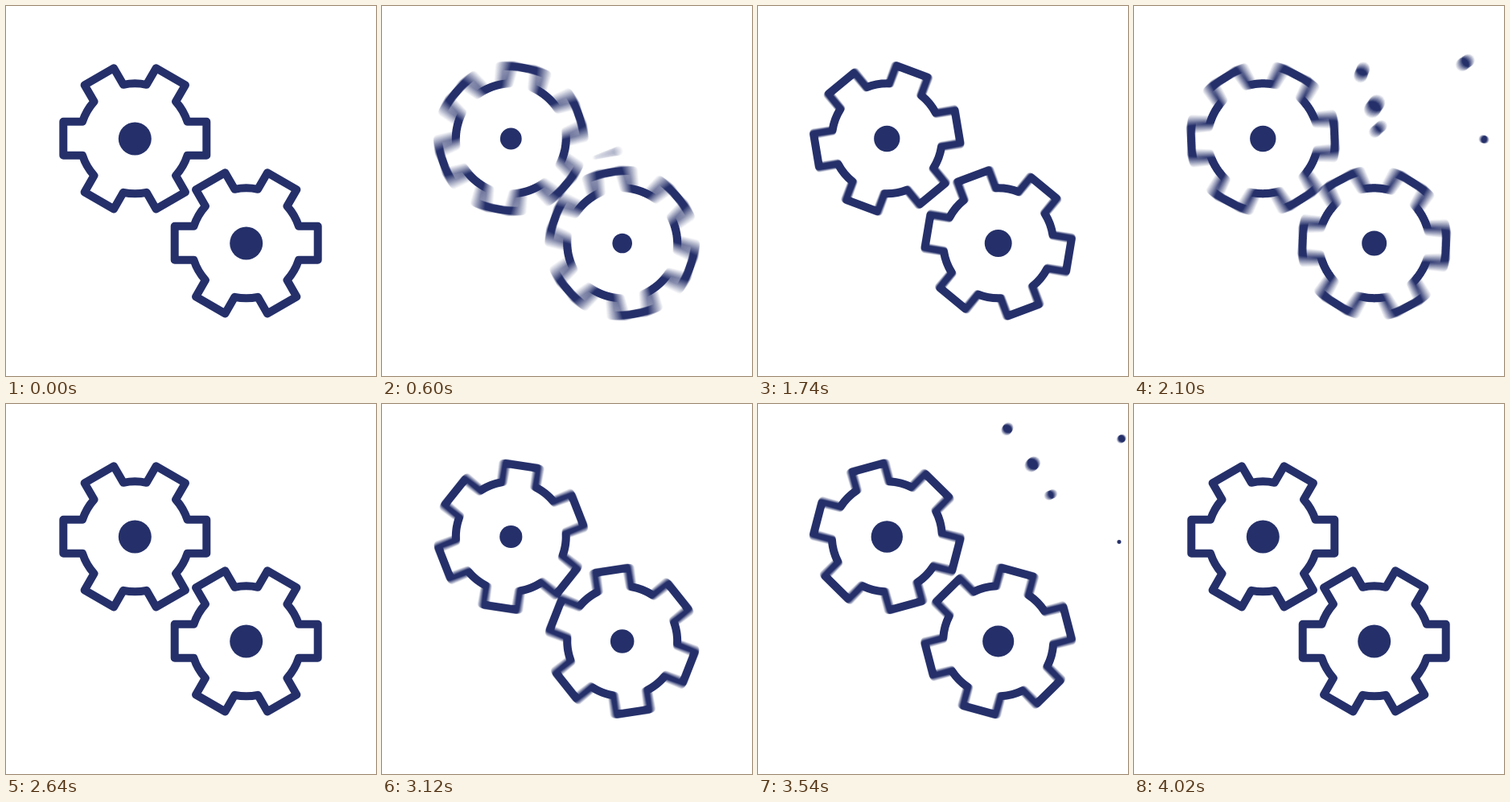
These frames come from a looping animation (460x460 px, 4.05 s). An HTML page with a canvas:

```html
<!DOCTYPE html>
<html lang="en">
<head>
<meta charset="utf-8">
<title>Gears</title>
<style>
  html, body { margin: 0; width: 100%; height: 100%; overflow: hidden; background: #fff; }
  canvas { display: block; width: 460px; height: 460px; }
</style>
</head>
<body>
<canvas id="stage" width="460" height="460"></canvas>
<script>
const SIZE = 460, LOOP = 4050, STEP = 30;
const FIRST = 270, PERIOD = 1320, SPINS = 3, TURN = 810, ACTIVE = 1020;
const SHUTTER = 15;
const NAVY = '#25306a';

const ctx = document.getElementById('stage').getContext('2d');
const layer = document.createElement('canvas');
layer.width = layer.height = SIZE;
const ink = layer.getContext('2d');

const gears = [
  { x: 160.3, y: 164.8, dir: -1, small: 13.4, shrink: 260 },
  { x: 298.7, y: 294.8, dir: 1, small: 12.3, shrink: 330 }
];

// Sparks: birth and end in ms after the spin begins, size, curve points
const sparks = [
  { birth: 312, end: 720, size: 8.3, path: [240, 196, 404, 144, 450, 172] },
  { birth: 345, end: 780, size: 11.7, path: [238, 208, 363, 100, 460, 38] },
  { birth: 395, end: 960, size: 10, path: [254, 199, 275, 60, 331, 6] },
  { birth: 400, end: 1000, size: 12, path: [244, 227, 300, 95, 376, 48] },
  { birth: 425, end: 1020, size: 8, path: [245, 222, 320, 110, 417, 98] }
];

const clamp = v => Math.min(1, Math.max(0, v));
const smooth = v => { v = clamp(v); return v * v * (3 - 2 * v); };

// cubic-bezier(.75, 0, .25, 1)
function ease(x) {
  if (x <= 0) return 0;
  if (x >= 1) return 1;
  let lo = 0, hi = 1;
  for (let i = 0; i < 24; i++) {
    const s = (lo + hi) / 2, q = 1 - s;
    const bx = 2.25 * q * q * s + 0.75 * q * s * s + s * s * s;
    if (bx < x) lo = s; else hi = s;
  }
  return smooth(lo);
}

const angleAt = t => 2 * Math.PI * ease(t / TURN);

function makeGear() {
  const body = 68.5, tip = 89, half = 21;
  const root = Math.sqrt(body * body - half * half);
  const spread = Math.asin(half / body);
  const path = new Path2D();
  for (let i = 0; i < 6; i++) {
    const a = i * Math.PI / 3, c = Math.cos(a), s = Math.sin(a);
    path.arc(0, 0, body, a - Math.PI / 3 + spread, a - spread);
    for (const [r, w] of [[tip, -half], [tip, half], [root, half]]) {
      path.lineTo(r * c - w * s, r * s + w * c);
    }
  }
  path.closePath();
  return path;
}
const gearPath = makeGear();

function disc(c, x, y, r) {
  c.beginPath();
  c.arc(x, y, r, 0, 2 * Math.PI);
  c.fill();
}

function drawSpark(p, t) {
  const age = (t - p.birth) / (p.end - p.birth);
  if (age <= 0 || age >= 1) return;
  const u = 1 - (1 - age) ** 3, q = 1 - u;
  const [x0, y0, x1, y1, x2, y2] = p.path;
  const x = q * q * x0 + 2 * q * u * x1 + u * u * x2;
  const y = q * q * y0 + 2 * q * u * y1 + u * u * y2;
  disc(ink, x, y, p.size * Math.min(1, age * 12) * (1 - age) ** 0.8);
}

function drawMoving(t) {
  const turn = angleAt(t);
  for (const g of gears) {
    ink.save();
    ink.translate(g.x, g.y);
    ink.rotate(g.dir * turn);
    ink.stroke(gearPath);
    ink.restore();
  }
  for (const p of sparks) drawSpark(p, t);
}

// Counts divide 255, so the summed alpha comes out exact
function sampleCount(t) {
  if (t <= 0 || t >= ACTIVE) return 1;
  const sweep = angleAt(t + SHUTTER / 2) - angleAt(t - SHUTTER / 2);
  return sweep > 0.07 ? 51 : 15;
}

function draw(time) {
  const spin = Math.min(SPINS - 1, Math.max(0, Math.floor((time - FIRST) / PERIOD)));
  const t = time - FIRST - spin * PERIOD;
  const n = sampleCount(t);

  ink.globalCompositeOperation = 'source-over';
  ink.globalAlpha = 1;
  ink.clearRect(0, 0, SIZE, SIZE);
  ink.globalCompositeOperation = 'lighter';
  ink.globalAlpha = 1 / n;
  ink.strokeStyle = ink.fillStyle = '#000';
  ink.lineWidth = 10;
  ink.lineJoin = 'round';
  for (let i = 0; i < n; i++) drawMoving(t + SHUTTER * ((i + 0.5) / n - 0.5));

  ink.globalCompositeOperation = 'source-in';
  ink.globalAlpha = 1;
  ink.fillStyle = NAVY;
  ink.fillRect(0, 0, SIZE, SIZE);

  ctx.fillStyle = '#fff';
  ctx.fillRect(0, 0, SIZE, SIZE);
  ctx.drawImage(layer, 0, 0);
  ctx.fillStyle = NAVY;
  for (const g of gears) {
    const squeeze = smooth(t / g.shrink) - smooth((t - 370) / 330);
    disc(ctx, g.x, g.y + 0.2, 20.5 - (20.5 - g.small) * squeeze);
  }
}

const start = performance.now();
let shown = -1;
function tick() {
  const time = Math.floor((performance.now() - start) % LOOP / STEP) * STEP;
  if (time !== shown) draw(shown = time);
  requestAnimationFrame(tick);
}
tick();
</script>
</body>
</html>
```
